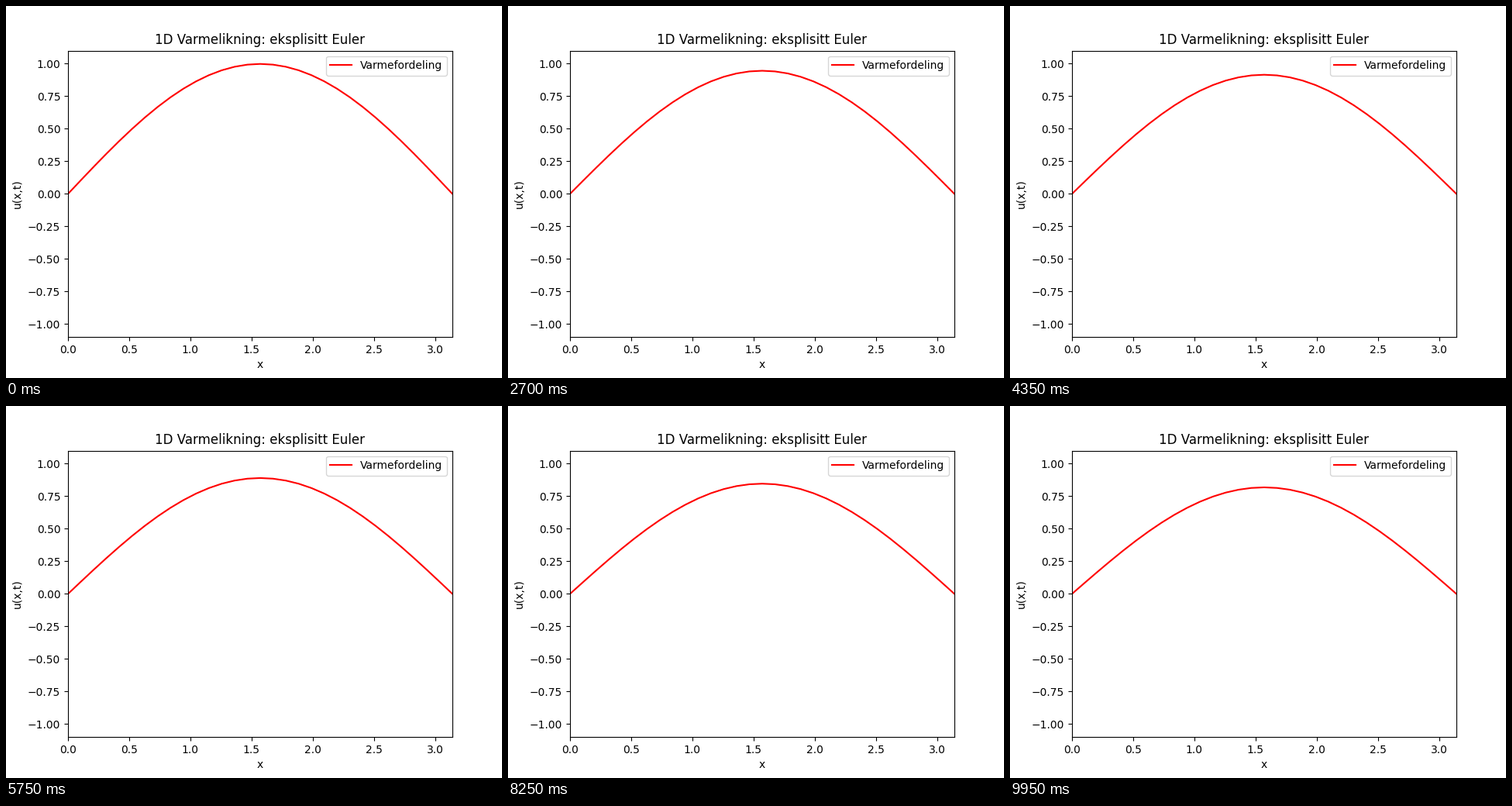
A matplotlib script for the animation above (10 s loop, 640 by 480 pixels).

```python
import numpy as np
import matplotlib.pyplot as plt
from matplotlib.animation import FuncAnimation

FRAMES = 200
INTERVAL = 50
CELLS = 30
DT = 0.001
LEAD_STEPS = 2  # Euler steps already taken when the loop starts

x = np.linspace(0, np.pi, CELLS + 1)
dx = x[1] - x[0]

# sin(x) is an eigenvector of the difference scheme,
# so each explicit Euler step scales it by a constant factor.
decay = 1 - DT * (2 * np.sin(dx / 2) / dx) ** 2


def heat(frame):
    return decay ** (frame + LEAD_STEPS) * np.sin(x)


fig, ax = plt.subplots(figsize=(6.4, 4.8), dpi=100)
line, = ax.plot(x, heat(0), color="red", label="Varmefordeling")
ax.set_xlim(0, np.pi)
ax.set_ylim(-1.1, 1.1)
ax.set_xlabel("x")
ax.set_ylabel("u(x,t)")
ax.set_title("1D Varmelikning: eksplisitt Euler")
ax.legend(loc="upper right")


def update(frame):
    line.set_ydata(heat(frame))
    return line,


anim = FuncAnimation(fig, update, frames=FRAMES, interval=INTERVAL, repeat=True)
plt.show()
```
